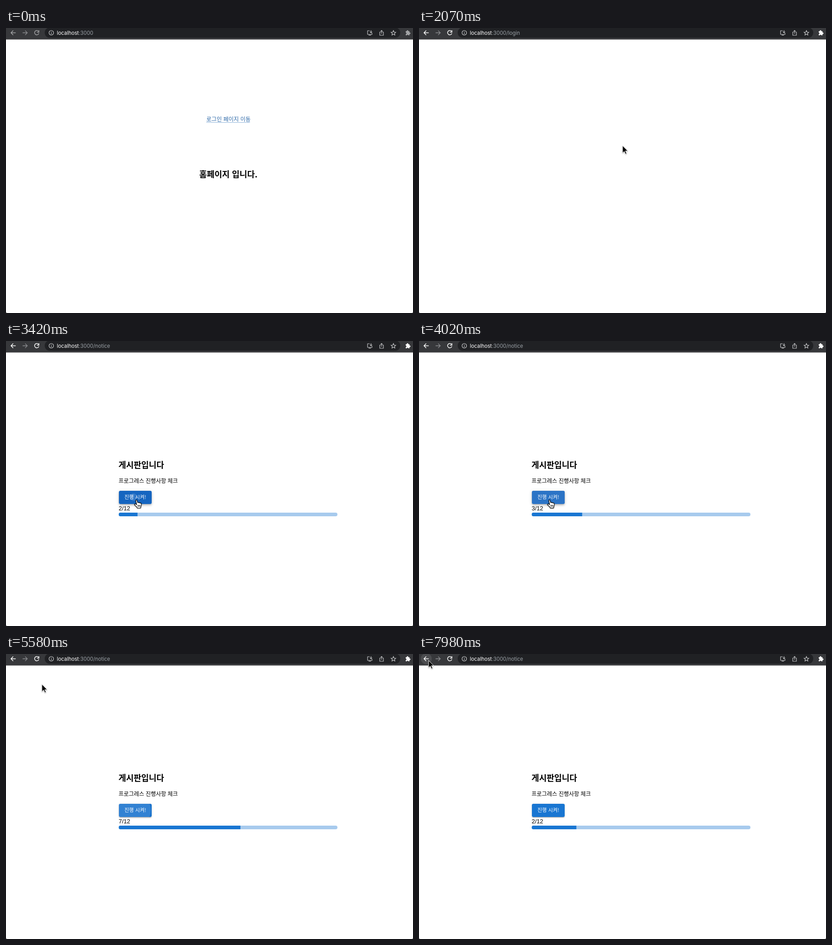
Animation, 894 px wide and 626 px high, one loop 8 s. Source, as an HTML page:

```html
<!DOCTYPE html>
<html lang="ko">
<head>
<meta charset="utf-8">
<title>Progress demo</title>
<style>
  html, body { margin: 0; width: 100%; height: 100%; overflow: hidden; background: #fff; }
  #stage { position: absolute; left: 0; top: 0; width: 894px; height: 626px; overflow: hidden; }
  svg { position: absolute; left: 0; top: 0; }
  text { font-family: "Noto Sans CJK KR", "Noto Sans CJK JP", sans-serif; white-space: pre; }
  .title { font-size: 18.15px; font-weight: 700; }
  .url { font-family: Inter, Roboto, sans-serif; font-size: 11.3px; fill: #9aa0a6; }
  .url .host { fill: #fff; }
  .count { font-family: "Liberation Sans", Arial, sans-serif; font-size: 13px; }
  .icon { fill: none; stroke: #c6c7c9; stroke-width: 1.2; }
  .nav { fill: none; stroke-width: 1.5; }
  #button { position: absolute; left: 247.5px; top: 328.5px; width: 72.5px; height: 29.5px;
    border-radius: 3.2px; overflow: hidden; }
  #shade { position: absolute; left: 247.5px; top: 328.5px; width: 72.5px; height: 29.5px; border-radius: 3.2px; }
  .ripple { position: absolute; left: -15.5px; top: -33.5px; width: 96px; height: 96px;
    border-radius: 50%; background: #fff; }
</style>
</head>
<body>
<div id="stage">
  <div id="board">
    <div id="shade"></div>
    <div id="button"></div>
    <svg width="894" height="626">
      <text class="title" x="247" y="278.6">게시판입니다</text>
      <text x="247.3" y="311.5" font-size="12.2">프로그레스 진행사항 체크</text>
      <text x="260" y="347" font-size="11.2" font-weight="500" fill="#fff">진행 시켜!</text>
      <text class="count" id="count" x="247.5" y="372"></text>
      <clipPath id="track"><rect x="247.5" y="377" width="480.5" height="8" rx="4"/></clipPath>
      <g clip-path="url(#track)">
        <rect x="247" y="377" width="482" height="8" fill="#a7caed"/>
        <rect id="bar" x="247.5" y="377" height="8" fill="#1976d2"/>
      </g>
    </svg>
  </div>

  <svg id="home" width="894" height="626">
    <text x="440" y="205" font-size="12.3" fill="#2c68a8">로그인 페이지 이동</text>
    <path id="underline" d="M440 207.5H536"/>
    <text class="title" x="424.5" y="328.4">홈페이지 입니다.</text>
  </svg>

  <svg width="894" height="626">
    <rect width="894" height="25" fill="#37383b"/>
    <rect y="24" width="894" height="1.4" fill="#4a4b4d"/>
    <rect x="85" y="-1" width="781" height="22.5" rx="11.2" fill="#202124"/>
    <circle id="hover" cx="16" cy="10.5" r="12" fill="#4b4c4f"/>
    <g class="nav">
      <path class="live" d="M21.3 10.5H11.2M15.8 5.6L11 10.5L15.8 15.4"/>
      <path stroke="#8d8e91" stroke-width="1.3" d="M36.5 10.5H46.6M42 5.6L46.8 10.5L42 15.4"/>
      <path class="live" d="M71.3 7.2A4.8 4.8 0 1 0 72.2 11.6"/>
      <path class="live" d="M72.3 5V9.2H68.1"/>
    </g>
    <g class="icon">
      <circle cx="99.5" cy="10.5" r="5"/>
      <path d="M99.5 9.8V13.4M99.5 7.4V8.7"/>
      <path d="M799 6H794.2V14H804V11M796.5 15.6H801.8M801.8 5V10.4M799.4 8.2L801.8 10.6L804.2 8.2"/>
      <path d="M823 9H821V16H829V9H827M825 12.5V5.6M822.8 7.6L825 5.4L827.2 7.6"/>
      <path id="star"/>
    </g>
    <path class="solid" d="M878 7H880.4A1.7 1.7 0 1 1 883.6 7H886.3V10A1.7 1.7 0 1 1 886.3 13.2V16H883.7A1.7 1.7 0 0 0 880.5 16H878V13.4A1.7 1.7 0 0 0 878 10Z"/>
    <text class="url" x="111.8" y="14.6"><tspan class="host">localhost</tspan>:3000<tspan id="route"></tspan></text>
    <path d="M0 624V626H2ZM894 624V626H892Z" fill="#777"/>

    <g id="cursor" style="filter: drop-shadow(0 1px 1px rgba(0,0,0,.35))">
      <path id="arrow" d="M0 0V16.2L3.8 12.6L6.6 18.6L9.1 17.5L6.4 11.7H11.5Z" stroke="#fff" stroke-width="1"/>
      <g id="hand" transform="translate(-5 -1)" fill="#fff" stroke="#000" stroke-width="1.2" stroke-linejoin="round">
        <path d="M4 2.4C4 .7 6.3.6 6.8 2.1L8.3 7.2C8.7 6.2 10.6 6.2 11 7.6C11.6 6.6 13.4 7 13.6 8.2C14.6 7.5 16.3 8.2 16.3 9.7C16.4 12 16.4 13.2 15.4 15.2L14.6 19H7.6C6.9 16.8 4.5 14.6 2.2 12.9C.5 11.6 1.2 9.4 3.4 10L6.1 11.4Z"/>
        <path d="M8.8 12V16M11 12V16M13.2 12V16" stroke-width="1"/>
      </g>
    </g>
  </svg>
</div>

<script>
const LOOP = 8000, BAR_TIME = 330, RIPPLE_TIME = 550, PRESS_HOLD = 110;
const LOGIN_AT = 1650, BOARD_AT = 2400, FOCUS_AT = 1000, BACK_HOVER_AT = 5640;
const BUTTON_HOVER = [3020, 5440];

// time, count
const COUNTS = [[2400, 1], [3410, 2], [3767, 3], [4160, 4], [4551, 5], [4955, 6], [5357, 7],
  [6296, 6], [6690, 5], [7082, 4], [7440, 3], [7800, 2]];
const PRESSES = [3340, 3650, 4045, 4430, 4840, 5245];

// time, x, y of the pointer tip
const PATH = [[30, 345, 580], [220, 375, 420], [420, 430, 240], [580, 470, 150], [720, 488, 190],
  [860, 496, 247], [1100, 492, 230], [1300, 485, 204], [1700, 485, 204], [2150, 439, 270],
  [2720, 439, 270], [3060, 300, 340], [3150, 286, 349], [4000, 286, 349], [4400, 285, 348],
  [5390, 285, 348], [5440, 255, 322], [5580, 80, 68], [5610, 47, 22], [5680, 20, 8],
  [5900, 18, 11], [6250, 21, 14], [8000, 21, 14]];

const $ = id => document.getElementById(id);
const clamp = v => Math.min(1, Math.max(0, v));
const mix = (a, b, u) => a + (b - a) * u;
const ease = u => { const v = clamp(u) ** 0.7; return v * v * (3 - 2 * v); };
const show = (id, on) => { $(id).style.display = on ? "" : "none"; };
const within = (x, y, l, t, r, b) => x >= l && x <= r && y >= t && y <= b;

$("star").setAttribute("d", "M" + Array.from({ length: 10 }, (_, i) => {
  const a = i * Math.PI / 5, r = i % 2 ? 2.5 : 5.5;
  return `${851 + r * Math.sin(a)} ${11 - r * Math.cos(a)}`;
}).join("L") + "Z");

const ripples = PRESSES.map(() => {
  const el = document.createElement("div");
  el.className = "ripple";
  return $("button").appendChild(el);
});

function pointerAt(t) {
  const i = PATH.findIndex(p => p[0] > t);
  if (i < 1) return PATH[i < 0 ? PATH.length - 1 : 0].slice(1);
  const [a, b] = [PATH[i - 1], PATH[i]];
  const u = (t - a[0]) / (b[0] - a[0]);
  return [mix(a[1], b[1], u), mix(a[2], b[2], u)];
}

function drawProgress(t) {
  const i = Math.max(0, COUNTS.findLastIndex(c => c[0] <= t));
  const [start, count] = COUNTS[i];
  const before = i ? COUNTS[i - 1][1] : count;
  $("count").textContent = count + "/12";
  $("bar").setAttribute("width", mix(before, count, clamp((t - start) / BAR_TIME)) * 480.5 / 12);
}

function drawButton(t) {
  const [enter, leave] = BUTTON_HOVER;
  const h = ease((t - enter) / 250) - ease((t - leave) / 250);
  $("button").style.background = `rgb(${mix(25, 21, h)},${mix(118, 101, h)},${mix(210, 192, h)})`;
  $("shade").style.boxShadow =
    `0 ${mix(2.4, 1.6, h)}px ${mix(.8, 3.2, h)}px ${mix(-1.6, -.8, h)}px rgba(0,0,0,.2),` +
    `0 ${mix(1.6, 3.2, h)}px ${mix(1.6, 4, h)}px rgba(0,0,0,.14),` +
    `0 .8px ${mix(4, 8, h)}px rgba(0,0,0,.12)`;
  ripples.forEach((el, i) => {
    const age = t - PRESSES[i], grow = ease(age / RIPPLE_TIME);
    const fade = 1 - ease((age - PRESS_HOLD) / RIPPLE_TIME);
    el.style.transform = `scale(${grow})`;
    el.style.opacity = age < 0 ? 0 : mix(.1, .3, grow) * fade;
  });
}

function render(t) {
  const home = t < LOGIN_AT, board = t >= BOARD_AT;
  const [x, y] = pointerAt(t);
  const onLink = home && t >= 30 && within(x, y, 440, 193, 536, 209);
  const onButton = board && within(x, y, 247, 328, 320, 358);

  show("home", home);
  show("board", board);
  $("route").textContent = home ? "" : board ? "/notice" : "/login";
  $("underline").setAttribute("stroke", onLink ? "#2a6cc0" : "#8fb4da");

  const live = t < FOCUS_AT ? "#a2a3a5" : "#fff";
  document.querySelectorAll(".live").forEach(el => el.setAttribute("stroke", live));
  document.querySelector(".solid").setAttribute("fill", live);
  show("hover", t >= BACK_HOVER_AT);

  if (board) {
    drawProgress(t);
    drawButton(t);
  }
  show("cursor", t >= 30);
  show("hand", onLink || onButton);
  show("arrow", !(onLink || onButton));
  $("cursor").setAttribute("transform", `translate(${x} ${y})`);
}

const began = performance.now();
function tick() {
  render((performance.now() - began) % LOOP);
  requestAnimationFrame(tick);
}
render(0);
requestAnimationFrame(tick);
</script>
</body>
</html>
```
